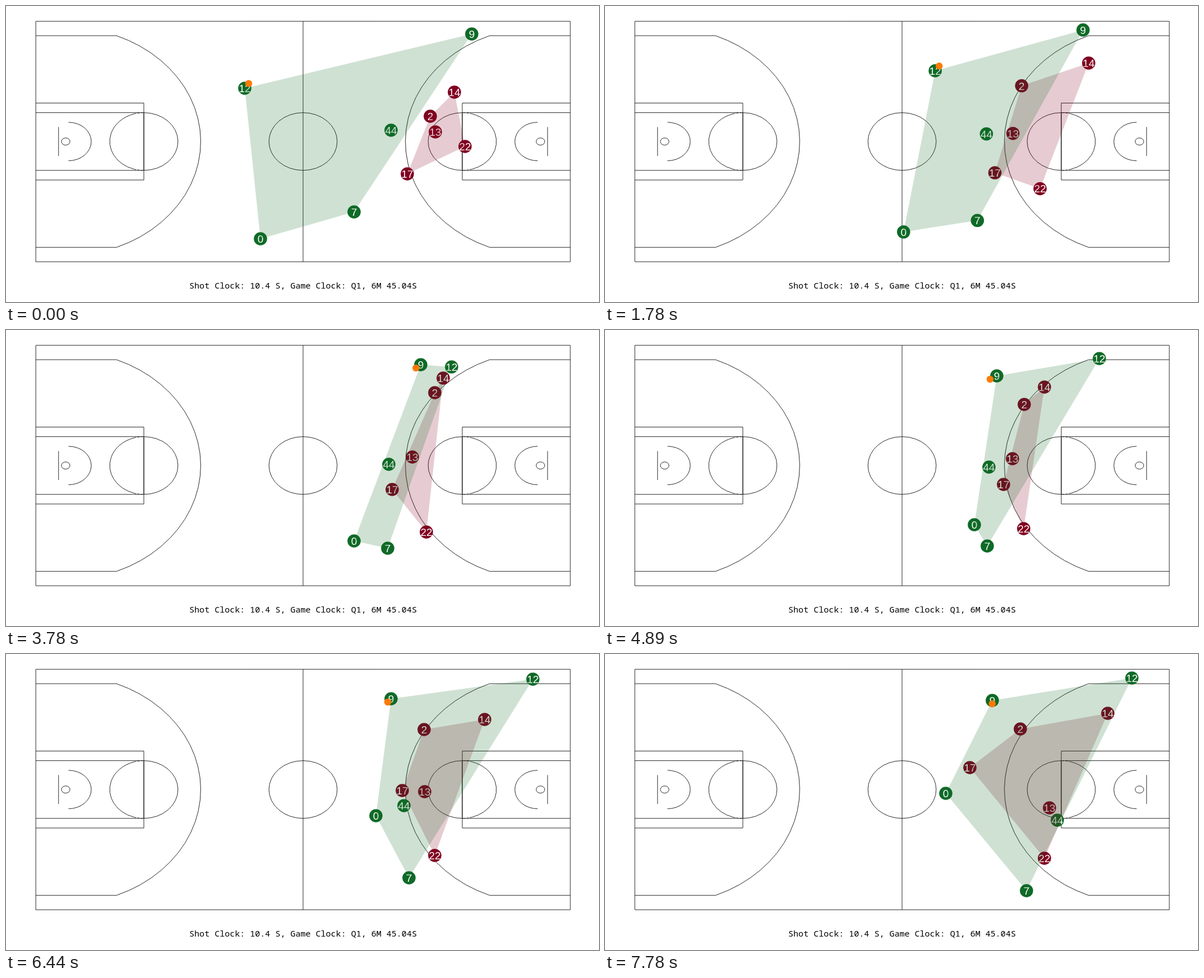
Write an HTML page with a canvas that moves like this. It is 1058x529 px and loops after 8 s.

```html
<!DOCTYPE html>
<html lang="en">
<head>
<meta charset="utf-8">
<style>
  html, body { margin: 0; width: 100%; height: 100%; overflow: hidden; background: #fff; }
  canvas { display: block; }
</style>
</head>
<body>
<canvas id="stage" width="1058" height="529"></canvas>
<script>
const ctx = document.getElementById('stage').getContext('2d');
const LOOP = 8000, STEPS = 36;
const GREEN = '#0f6a27', RED = '#800020', ORANGE = '#ff7a05';

// Every player runs a smooth curve through one waypoint per beat.
const BEATS = [0, 12, 17, 22, 29, 35];
const player = (label, xs, ys) => ({ label, xs, ys });

const reds = [
  player(14, [800, 851, 780, 784, 854, 897], [154, 88, 86, 102, 117, 106]),
  player(2, [757, 747, 765, 748, 746, 741], [197, 124, 112, 133, 135, 134]),
  player(13, [766, 720, 725, 727, 747, 793], [225, 228, 227, 230, 246, 275]),
  player(22, [819, 761, 750, 747, 765, 784], [251, 350, 361, 355, 360, 365]),
  player(17, [716, 690, 689, 711, 707, 651], [300, 294, 285, 276, 244, 203]),
];
const nine = player(9, [831, 825, 740, 699, 687, 691], [50, 47, 62, 82, 80, 83]);
const twelve = player(12, [426, 677, 795, 882, 940, 940], [147, 96, 66, 51, 45, 43]);
const greens = [
  nine,
  twelve,
  player(44, [687, 680, 683, 685, 710, 807], [222, 233, 240, 245, 271, 297]),
  player(7, [621, 677, 681, 682, 719, 752], [368, 388, 390, 386, 400, 423]),
  player(0, [454, 572, 621, 659, 660, 608], [416, 394, 377, 348, 289, 249]),
];

// Cubic Hermite spline with natural ends.
function spline(values, step) {
  const last = BEATS.length - 1;
  const gap = j => BEATS[j + 1] - BEATS[j];
  const chord = j => (values[j + 1] - values[j]) / gap(j);
  const slope = j =>
    j === 0 ? 1.5 * chord(0) - 0.5 * slope(1) :
    j === last ? 1.5 * chord(last - 1) - 0.5 * slope(last - 1) :
    (chord(j - 1) * gap(j) + chord(j) * gap(j - 1)) / (gap(j - 1) + gap(j));
  const i = Math.max(0, BEATS.findIndex(b => b >= step) - 1);
  const u = (step - BEATS[i]) / gap(i), v = 1 - u;
  return v * v * (values[i] * (1 + 2 * u) + slope(i) * gap(i) * u) +
    u * u * (values[i + 1] * (1 + 2 * v) - slope(i + 1) * gap(i) * v);
}

const spot = ({ xs, ys }, step) => [spline(xs, step), spline(ys, step)];

// The ball swings beside its carrier and is handed from 12 to 9.
function ballSpot(step) {
  const [ax, ay] = spot(twelve, step), [bx, by] = spot(nine, step);
  const from = [ax + 7 + 6 * Math.sin(step * Math.PI / 8), ay - 8.5];
  const to = [bx - 6 - 6 * Math.cos((step - 22) * Math.PI / 14), by + 6];
  const pass = Math.min(1, Math.max(0, (step - 13) / 4));
  return from.map((a, k) => a + (to[k] - a) * pass);
}

function convexHull(points) {
  const sorted = [...points].sort((p, q) => p[0] - q[0] || p[1] - q[1]);
  const chain = list => {
    const out = [];
    for (const p of list) {
      while (out.length > 1) {
        const [a, b] = out.slice(-2);
        if ((b[0] - a[0]) * (p[1] - a[1]) - (b[1] - a[1]) * (p[0] - a[0]) > 0) break;
        out.pop();
      }
      out.push(p);
    }
    return out.slice(0, -1);
  };
  return [...chain(sorted), ...chain(sorted.reverse())];
}

function disc([x, y], r, color) {
  ctx.fillStyle = color;
  ctx.beginPath();
  ctx.arc(x, y, r, 0, 7);
  ctx.fill();
}

function text(str, x, y, font, color) {
  ctx.font = font;
  ctx.fillStyle = color;
  ctx.fillText(str, x, y);
}

// Paths are given in feet; the line width stays in pixels.
function courtLine(mirrored, path, dash = []) {
  const sx = 953.6 / 94, sy = 429.8 / 50;
  ctx.beginPath();
  ctx.setTransform(mirrored ? -sx : sx, 0, 0, sy, mirrored ? 1006.8 : 53.2, 27.3);
  path();
  ctx.resetTransform();
  ctx.setLineDash(dash);
  ctx.stroke();
}

function keyLine(top, bottom) {
  ctx.moveTo(0, top);
  ctx.lineTo(19, top);
  ctx.lineTo(19, bottom);
  ctx.lineTo(0, bottom);
}

function drawCourt() {
  const half = Math.PI / 2, gap = 0.29, corner = Math.asin(22 / 23.75);
  ctx.strokeStyle = '#000';
  ctx.lineWidth = 0.85;
  courtLine(false, () => {
    ctx.rect(0, 0, 94, 50);
    ctx.moveTo(47, 0);
    ctx.lineTo(47, 50);
    ctx.moveTo(53, 25);
    ctx.arc(47, 25, 6, 0, 4 * half);
  });
  for (const side of [false, true]) {
    courtLine(side, () => {
      keyLine(17, 33);
      ctx.moveTo(0, 3);
      ctx.arc(5.25, 25, 23.75, -corner, corner);
      ctx.lineTo(0, 47);
      ctx.moveTo(4, 22);
      ctx.lineTo(4, 28);
      ctx.moveTo(6, 25);
      ctx.arc(5.25, 25, 0.75, 0, 4 * half);
      ctx.moveTo(5.75, 21);
      ctx.arc(5.75, 25, 4, -half, half);
      ctx.moveTo(19, 19);
      ctx.arc(19, 25, 6, -half, half);
      ctx.moveTo(19 - 6 * Math.sin(gap), 25 + 6 * Math.cos(gap));
      ctx.arc(19, 25, 6, half + gap, 3 * half - gap);
    });
    courtLine(side, () => keyLine(19, 31));
    courtLine(side, () => ctx.arc(19, 25, 6, 3 * half - gap, 3 * half), [4, 2]);
    courtLine(side, () => ctx.arc(19, 25, 6, half + gap, half, true), [4, 2]);
  }
}

function drawPlayers(team, color, step) {
  return team.map(p => {
    const at = spot(p, step);
    disc(at, 11.8, color);
    text(p.label, at[0], at[1] + 7, '19px "Liberation Sans", Arial, sans-serif', '#fff');
    return at;
  });
}

function drawHull(points, color) {
  ctx.globalAlpha = 0.2;
  ctx.fillStyle = color;
  ctx.beginPath();
  convexHull(points).forEach(p => ctx.lineTo(...p));
  ctx.fill();
  ctx.globalAlpha = 1;
}

function draw(now) {
  // The picture holds between steps; the small lead absorbs timer rounding.
  const step = Math.min(STEPS - 1, Math.floor((now % LOOP + 5) * STEPS / LOOP));
  ctx.fillStyle = '#fff';
  ctx.fillRect(0, 0, 1058, 529);
  ctx.textAlign = 'center';
  drawCourt();
  const redSpots = drawPlayers(reds, RED, step);
  const greenSpots = drawPlayers(greens, GREEN, step);
  drawHull(redSpots, RED);
  drawHull(greenSpots, GREEN);
  disc(ballSpot(step), 6.2, ORANGE);
  text('Shot Clock: 10.4 S, Game Clock: Q1, 6M 45.04S', 530, 505,
    '15.04px "Noto Sans Mono", monospace', '#000');
}

const start = performance.now();
function tick() {
  draw(performance.now() - start);
  requestAnimationFrame(tick);
}
tick();
</script>
</body>
</html>
```
